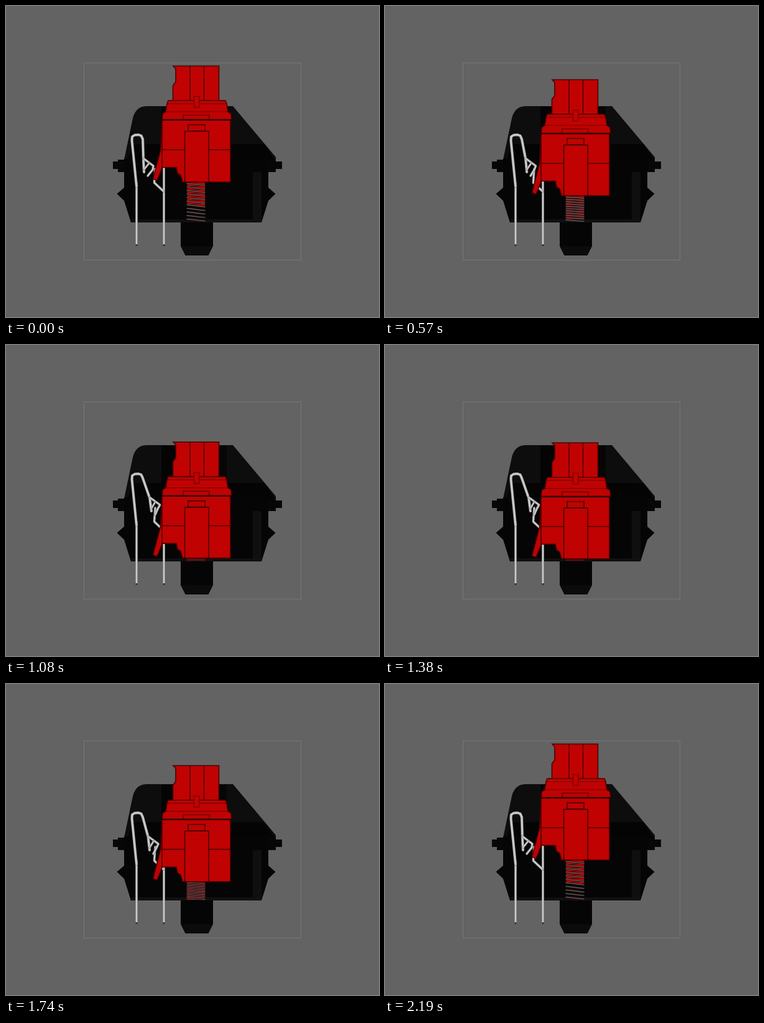
An HTML page with a canvas that plays this animation: 600 by 500 pixels, repeating every 2.22 s.

```html
<!DOCTYPE html>
<html lang="en">
<head>
<meta charset="utf-8">
<title>Key switch</title>
<style>
html, body { margin: 0; width: 100%; height: 100%; overflow: hidden; background: #636363; }
canvas { display: block; }
</style>
</head>
<body>
<canvas id="stage" width="600" height="500"></canvas>
<script>
const ctx = document.getElementById('stage').getContext('2d');
const LOOP = 2220, STEP = 30, FLOOR = 347;
const PRESS = 60, BOTTOM = 1245, REST = 2190, DEPTH = 63;
const RED = '#c00202', EDGE = '#4a0000';

const wave = u => (1 - Math.cos(Math.PI * u)) / 2;

// How far the stem is pressed, in px
function travelAt(t) {
  if (t <= PRESS || t >= REST) return 0;
  const u = t < BOTTOM
    ? ((t - PRESS) / (BOTTOM - PRESS)) ** 1.08
    : ((REST - t) / (REST - BOTTOM)) ** 0.85;
  return DEPTH * wave(u);
}

function trace(pts) {
  ctx.beginPath();
  for (const [x, y] of pts) ctx.lineTo(x, y);
}

function line(pts, color = EDGE, width = 1.5) {
  trace(pts);
  ctx.strokeStyle = color;
  ctx.lineWidth = width;
  ctx.stroke();
}

function poly(pts, fill, edge) {
  trace(pts);
  ctx.closePath();
  ctx.fillStyle = fill;
  ctx.fill();
  if (!edge) return;
  ctx.strokeStyle = edge;
  ctx.lineWidth = 1.6;
  ctx.stroke();
}

// Symmetric outline from [half width, y] pairs
const mirror = (cx, half) => [
  ...half.map(([w, y]) => [cx + w, y]),
  ...half.map(([w, y]) => [cx - w, y]).reverse()
];

function rect(x, y, w, h, fill, edge) {
  poly([[x, y], [x + w, y], [x + w, y + h], [x, y + h]], fill, edge);
}

function backdrop() {
  rect(0, 0, 600, 500, '#636363');
  ctx.strokeStyle = '#777';
  ctx.lineWidth = 1;
  ctx.strokeRect(125.5, 91.5, 349, 317);
}

function housing() {
  // Foot and side clips
  poly(mirror(307, [[26, 346], [26, 386], [18.5, 401]]), '#050505');
  poly(mirror(307, [[25, 386], [18, 400]]), '#0b0b0b');
  rect(172, 250, 272, 12, '#070707');
  rect(180, 247, 254, 20, '#070707');

  // Upper shell
  ctx.beginPath();
  ctx.moveTo(190, 247);
  ctx.lineTo(203, 185);
  ctx.quadraticCurveTo(207, 161, 226, 161);
  ctx.lineTo(365, 161);
  ctx.lineTo(434, 243);
  ctx.lineTo(434, 247);
  ctx.fillStyle = '#0d0d0d';
  ctx.fill();
  rect(250, 162, 22, 62, '#040404');
  rect(343, 162, 12, 62, '#060606');
  poly([[204, 222], [416, 222], [432, 247], [196, 247]], '#040404');

  // Lower shell
  poly(mirror(306, [[116, 245], [116, 292], [127.5, 302], [116, 313], [105, 348]]), '#050505');
  rect(397, 267, 14, 79, '#0f0f0f');
  rect(202, 343, 209, 5, '#101010');
}

function wire(pts, width) {
  line(pts, '#777', width);
  line(pts, '#cacaca', width - 1.3);
}

function contacts(travel) {
  const bend = 12 * Math.sin(travel / 41);
  const knee = 221 + bend * 0.85, tip = 222 + bend;
  ctx.lineJoin = ctx.lineCap = 'round';

  // Fixed contact
  wire([[254, 384], [254, 240]], 3.8);
  wire([[253.5, 298], [238.5, 284], [240, 262]], 3.8);

  // Leaf spring, bent at its upper loop
  wire([[210, 384], [210, 285]], 3.8);
  wire([[210, 290], [202.5, 216], [203, 210], [207, 207.5], [213, 207], [217.5, 208.5],
    [220, 214], [knee, 246], [tip, 267]], 4.4);
  wire([[knee, 245], [237 + bend * 0.9, 257], [236 + bend * 0.7, 263], [228 + bend, 273]], 3.8);
  wire([[tip, 263], [230 + bend * 0.8, 253]], 3.4);

  ctx.lineCap = 'butt';
  ctx.lineJoin = 'miter';
  for (const x of [210, 254]) rect(x - 1.5, 383, 3, 3, '#333');
}

function spring(travel) {
  const top = 284 + travel, turns = 11, gap = (FLOOR - top) / turns;
  const width = Math.min(1.5, gap * 0.4);
  ctx.save();
  ctx.beginPath();
  ctx.rect(280, 270, 60, FLOOR - 270);
  ctx.clip();
  rect(291.5, top - 2, 28.5, 39, RED);
  for (let i = 0; i < turns; i++) {
    const y = top + gap * (i + 0.5), h = gap * 0.3;
    line([[292, y + gap * 0.7], [319, y + h]], '#2a0c0c', width * 0.7);
    line([[290.5, y - h], [320.5, y + h]], '#200606', width * 1.8);
    line([[290.5, y - h], [320.5, y + h]], '#5c5c5c', width);
  }
  ctx.restore();
}

function stem(travel) {
  ctx.save();
  ctx.translate(0, travel);

  // Cap mount
  poly([[269, 96.5], [342.5, 96.5], [342.5, 154], [268.5, 154], [268.5, 128],
    [273, 122], [273, 101]], RED, EDGE);
  for (const x of [296, 318.5]) line([[x, 97], [x, 152]]);

  // Left leg
  poly([[251, 182], [248.5, 232], [236.5, 278], [243, 280.5], [252, 258]], RED, EDGE);

  // Body
  poly([[251, 183], [361, 183], [361, 283], [284, 283], [281, 272], [276, 269],
    [274, 259.5], [251, 259.5]], RED, EDGE);
  line([[251, 231], [361, 231]]);
  rect(293, 191, 27, 10, RED, EDGE);
  rect(287.5, 201.5, 38.5, 81.5, RED, EDGE);

  // Collar
  poly(mirror(307, [[46, 152], [48, 157], [50, 170], [55, 173], [56, 183]]), RED, EDGE);
  for (const [w, y] of [[48, 157], [50, 170]]) line([[307 - w, y], [307 + w, y]], '#750000', 1.2);
  rect(302.5, 145.5, 8.5, 17.5, RED, '#850000');
  rect(285, 175.5, 42, 7.5, RED, '#750000');
  line([[251, 183], [363, 183]], '#2c0000', 2.4);
  ctx.restore();
}

function draw(ms) {
  const travel = travelAt(Math.floor(ms % LOOP / STEP) * STEP);
  backdrop();
  housing();
  contacts(travel);
  spring(travel);
  stem(travel);
}

let start = null;
function tick(now) {
  start ??= now;
  draw(now - start);
  requestAnimationFrame(tick);
}
draw(0);
requestAnimationFrame(tick);
</script>
</body>
</html>
```
